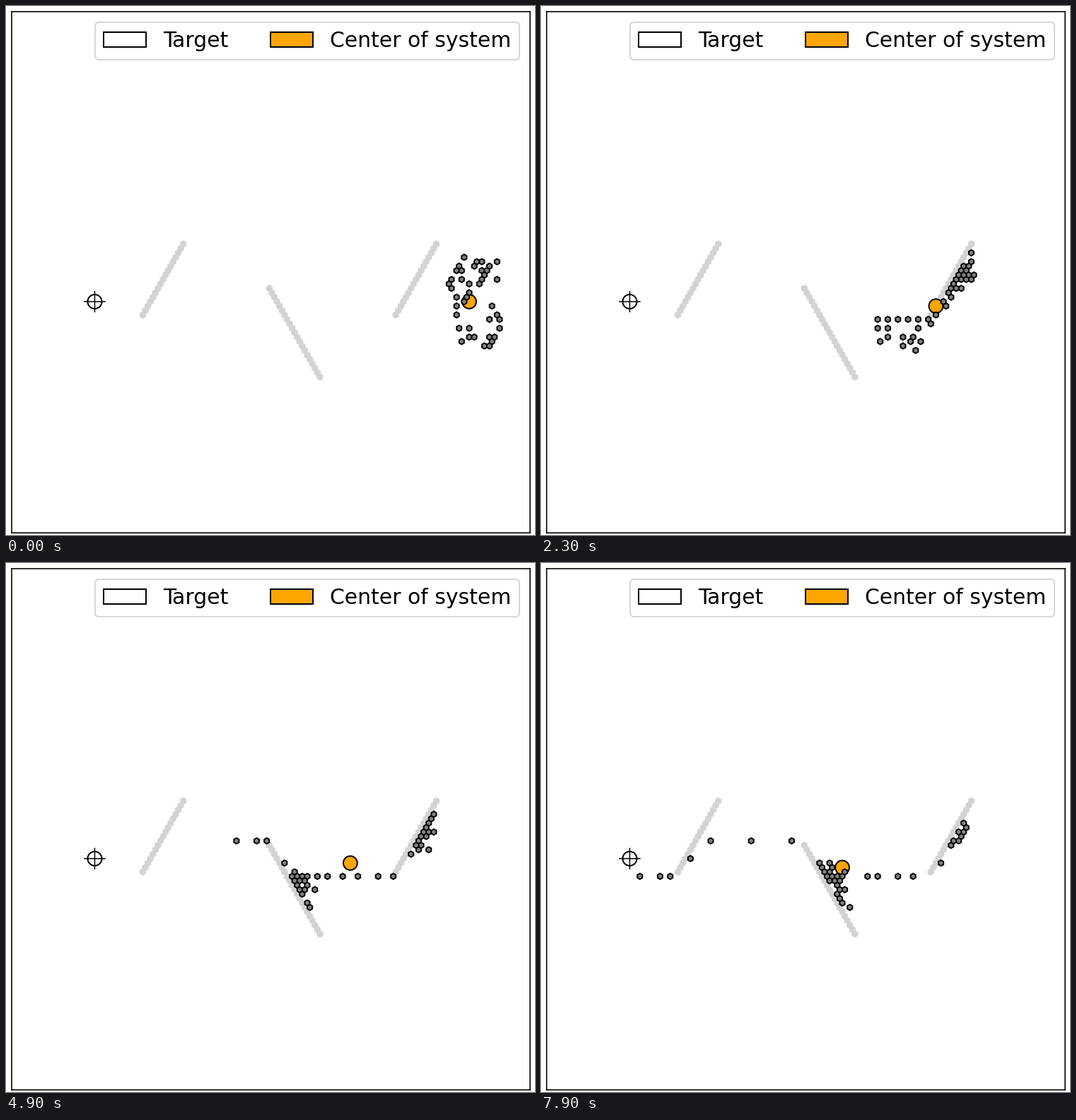
A matplotlib script for the animation above (8000 ms loop, 748 px wide and 748 px high).

```python
import random

import matplotlib.pyplot as plt
import numpy as np
from matplotlib.animation import FuncAnimation
from matplotlib.collections import PolyCollection
from matplotlib.patches import Circle

SIZE, DPI = 748, 144
STEPS = 80
DX, DY = 3.578, 6.27          # half a column, one row of the hex lattice
X0, Y0 = 655, 418

# Cells are (half-column, row).
LEFT, DOWN_LEFT, UP_LEFT = (-2, 0), (-1, -1), (-1, 1)
MOVES = [LEFT, DOWN_LEFT, UP_LEFT, (1, -1), (1, 1), (2, 0)]
GOAL = (-148, 0)

WALLS = {(r - 26, r) for r in range(-3, 14)}
WALLS |= {(-76 - r, r) for r in range(-17, 4)}
WALLS |= {(r - 126, r) for r in range(-3, 14)}

# Start of the swarm: columns by row.
START = {10: [-2], 9: [3, 5, 11], 8: [-4, 2, 8], 7: [-5, -3, 5, 7], 6: [6],
         5: [-7, -3, 5, 11], 4: [-8, 0, 4], 3: [-7], 2: [0], 1: [-5, -1],
         0: [-2], -1: [-5, 9], -3: [-5, 11], -4: [8, 12], -6: [-4, 0, 12],
         -8: [0, 2, 8, 10], -9: [-3, 9], -10: [6, 8]}


def shift(cell, move):
    return cell[0] + move[0], cell[1] + move[1]


def advance(cells, rng):
    """Go left if free; when blocked, slide if alone, jostle in a crowd."""
    swarm = set(cells)
    taken = WALLS | swarm
    moved = []
    for cell in cells:
        new = shift(cell, LEFT)
        if new in taken:
            if any(shift(cell, m) in swarm for m in MOVES):
                new = shift(cell, rng.choice(MOVES))
            else:
                new = shift(cell, DOWN_LEFT)
                if new in taken:
                    new = shift(cell, UP_LEFT)
        if new in taken:
            new = cell
        taken.add(new)
        moved.append(new)
    return moved


def simulate():
    rng = random.Random(4)
    steps = [[(h, r) for r, cols in START.items() for h in cols]]
    while len(steps) < STEPS:
        steps.append(advance(steps[-1], rng))
    return steps


def place(cell):
    return X0 + DX * cell[0], Y0 - DY * cell[1]


angles = np.radians(np.arange(30, 390, 60))
HEX = np.column_stack([np.cos(angles), np.sin(angles)]) * 4.13


def hexes(cells):
    return [HEX + place(c) for c in cells]


def center(cells):
    """Mean column and row, rounded down to a cell."""
    col = np.floor(np.mean([h // 2 for h, _ in cells]))
    row = np.floor(np.mean([r for _, r in cells]))
    return 2 * col + row % 2, row


steps = simulate()

L, R, T, B = 7.8, 741, 8, 745
fig = plt.figure(figsize=(SIZE / DPI, SIZE / DPI), dpi=DPI, facecolor="white")
ax = fig.add_axes([L / SIZE, 1 - B / SIZE, (R - L) / SIZE, (B - T) / SIZE])
ax.set(xlim=(L, R), ylim=(B, T), xticks=[], yticks=[])

ax.add_collection(PolyCollection(hexes(sorted(WALLS)), facecolor="lightgray",
                                 edgecolor="lightgray", linewidth=1, zorder=1))

gx, gy = place(GOAL)
goal = ax.add_patch(Circle((gx, gy), 10, facecolor="white", edgecolor="black",
                           linewidth=1, zorder=2, label="Target"))
cross = dict(color="black", lw=0.75, zorder=2.1, snap=False)
ax.plot([gx - 14.5, gx + 14.5], [gy, gy], **cross)
ax.plot([gx, gx], [gy - 14.5, gy + 14.5], **cross)

middle = ax.add_patch(Circle(place(center(steps[0])), 9.9, facecolor="orange",
                             edgecolor="black", linewidth=1, zorder=2.5,
                             label="Center of system"))
swarm = ax.add_collection(PolyCollection(hexes(steps[0]), facecolor="gray",
                                         edgecolor="black", linewidth=0.95,
                                         zorder=3))
ax.legend(handles=[goal, middle], loc="upper right", ncol=2, fontsize=14.96)


def update(i):
    swarm.set_verts(hexes(steps[i]))
    middle.center = place(center(steps[i]))
    return swarm, middle


anim = FuncAnimation(fig, update, frames=STEPS, interval=100, repeat=True,
                     repeat_delay=0, blit=False)
plt.show()
```
